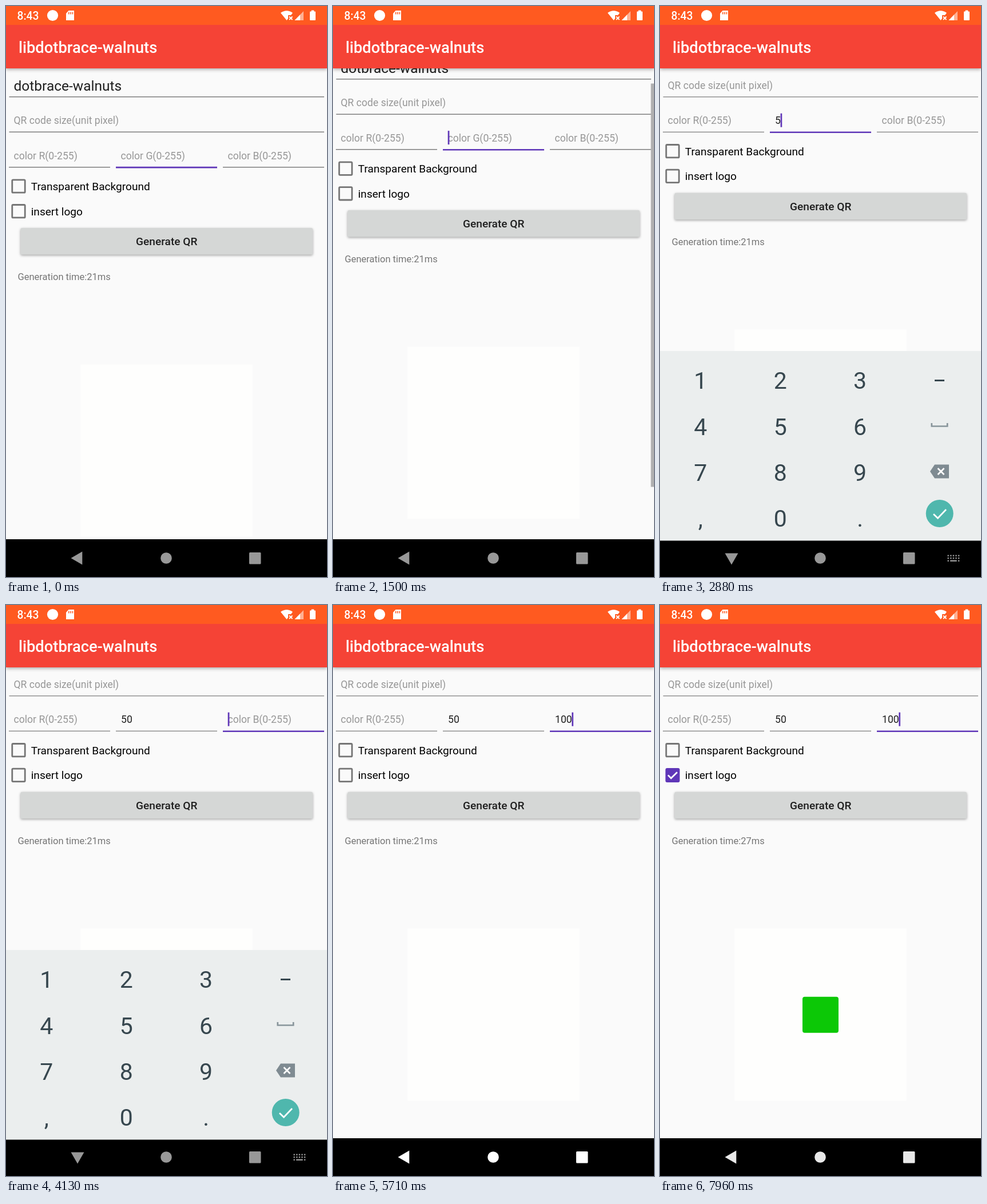
Write an HTML page with a canvas that moves like this. It is 561 px wide and 998 px high and loops after 8000 ms.

```html
<!DOCTYPE html>
<html lang="en">
<head>
<meta charset="utf-8">
<title>Generator form</title>
<style>
html, body { margin: 0; width: 100%; height: 100%; overflow: hidden; background: #000; }
canvas { display: block; width: 100%; height: 100%; }
</style>
</head>
<body>
<canvas id="stage" width="561" height="998"></canvas>
<script>
const W = 561, H = 998, LOOP = 8000;
const NAV_TOP = 932, KEYS_TOP = 603;
const PURPLE = '#5f36b8', GREY = '#757575', INK = '#1f1f1f', HINT = '#979797';
const ctx = document.getElementById('stage').getContext('2d');

// Moments in the loop, in ms
const SCROLL = [1330, 2150], KEYS_IN = [2300, 2540], KEYS_OUT = [5350, 5560];
const FOCUS_B = 3750, CHECKED = 5980, GENERATED = 6480;
const TYPED_G = [[2760, '5'], [3120, '50']];
const TYPED_B = [[4150, '1'], [4420, '10'], [4650, '100']];

const clamp = v => Math.max(0, Math.min(1, v));
const ramp = (t, [a, b]) => clamp((t - a) / (b - a));
const easeOut = p => 1 - (1 - p) ** 3;
const typed = (t, steps) => steps.reduce((s, [at, text]) => (t >= at ? text : s), '');

function text(s, x, y, size, color, weight = 400, align = 'left') {
  ctx.font = `${weight} ${size}px Roboto, sans-serif`;
  ctx.textAlign = align;
  ctx.fillStyle = color;
  ctx.fillText(s, x, y);
}

function rect(x, y, w, h, color, r = 0) {
  ctx.fillStyle = color;
  ctx.beginPath();
  ctx.roundRect(x, y, w, h, r);
  ctx.fill();
}

function circle(x, y, r, color) {
  ctx.fillStyle = color;
  ctx.beginPath();
  ctx.arc(x, y, r, 0, Math.PI * 2);
  ctx.fill();
}

function trace(points) {
  ctx.beginPath();
  points.forEach(([x, y], i) => (i ? ctx.lineTo(x, y) : ctx.moveTo(x, y)));
}

function poly(points, color) {
  trace(points);
  ctx.closePath();
  ctx.fillStyle = color;
  ctx.fill();
}

function line(points, color, width) {
  trace(points);
  ctx.strokeStyle = color;
  ctx.lineWidth = width;
  ctx.stroke();
}

function shadow(blur, dy, alpha, draw) {
  ctx.save();
  ctx.shadowColor = `rgba(0,0,0,${alpha})`;
  ctx.shadowBlur = blur;
  ctx.shadowOffsetY = dy;
  draw();
  ctx.restore();
}

function statusBar() {
  rect(0, 0, W, 33, '#ff5a20');
  text('8:43', 19.5, 23.5, 19.3, '#fff', 500);
  circle(81.5, 16.5, 9.6, '#fff');
  // memory card
  poly([[109.5, 8], [119, 8], [119, 25], [105, 25], [105, 13]], '#fff');
  [109, 112.3, 115.6].forEach(x => rect(x, 10.5, 1.6, 4, '#ff5a20'));
  // wifi without connection
  ctx.beginPath();
  ctx.moveTo(490.5, 25);
  ctx.lineTo(480, 12);
  ctx.quadraticCurveTo(490.5, 4.5, 501, 12);
  ctx.lineTo(498, 16);
  ctx.lineTo(493, 16);
  ctx.lineTo(493, 22);
  ctx.closePath();
  ctx.fillStyle = '#fff';
  ctx.fill();
  line([[495, 18.5], [500.5, 24]], '#fff', 1.8);
  line([[500.5, 18.5], [495, 24]], '#fff', 1.8);
  // signal
  poly([[520, 9], [520, 25], [504.5, 25]], '#ffb093');
  poly([[514, 15.2], [514, 25], [504.5, 25]], '#fff');
  // battery
  rect(531, 9.5, 10, 15.5, '#fff', 1);
  rect(533.7, 7.5, 4.6, 3, '#fff');
}

function appBar() {
  shadow(6, 2, 0.32, () => rect(0, 33, W, 76, '#f54336'));
  text('libdotbrace-walnuts', 22, 81.5, 27.3, '#fff', 500);
}

function underline(x, y, w, focused) {
  if (focused) rect(x, y - 0.2, w, 2.6, PURPLE);
  else rect(x, y, w, 1.4, '#7e7e7e');
}

function numberField(x, hint, value, focused, caret) {
  if (value) text(value, x + 9, 267.8, 17.6, INK);
  else text(hint, x + 8.5, 267.8, 17.6, HINT);
  underline(x, 281, 177, focused);
  if (caret) {
    ctx.font = '400 17.6px Roboto, sans-serif';
    rect(x + 8.7 + ctx.measureText(value).width, 249, 2.7, 24, PURPLE);
  }
}

function checkbox(y, label, checked) {
  if (checked) {
    rect(9.5, y - 12.3, 25, 25, PURPLE, 3);
    line([[14, y + 0.2], [19.3, y + 5.6], [30, y - 5]], '#fff', 2.7);
  } else {
    ctx.strokeStyle = GREY;
    ctx.lineWidth = 2.8;
    ctx.beginPath();
    ctx.roundRect(10.8, y - 11, 22.4, 22.4, 1.5);
    ctx.stroke();
  }
  text(label, 43.7, y + 7, 19.1, '#000');
}

function caretOn(t) {
  if (t < KEYS_IN[0]) return (t + 950) % 1000 < 500;
  const starts = [KEYS_IN[0], ...TYPED_G.map(s => s[0]), FOCUS_B, ...TYPED_B.map(s => s[0])];
  const last = Math.max(...starts.filter(s => s <= t));
  return (t - last) % 1000 < 500;
}

function form(t, scroll) {
  const onB = t >= FOCUS_B, caret = caretOn(t), done = t >= GENERATED;
  ctx.save();
  ctx.beginPath();
  ctx.rect(0, 109, W, NAV_TOP - 109);
  ctx.clip();
  ctx.translate(0, -scroll);

  text('dotbrace-walnuts', 13.5, 148, 24.5, INK);
  underline(5.5, 158, 550.5, false);
  text('QR code size(unit pixel)', 13.5, 206.3, 17.6, HINT);
  underline(5.5, 219.5, 550.5, false);
  numberField(5, 'color R(0-255)', '', false, false);
  numberField(192, 'color G(0-255)', typed(t, TYPED_G), !onB, !onB && caret);
  numberField(379, 'color B(0-255)', typed(t, TYPED_B), onB, onB && caret);
  checkbox(314.8, 'Transparent Background', false);
  checkbox(358.5, 'insert logo', t >= CHECKED);
  shadow(4, 1.5, 0.35, () => rect(25.5, 388, 510.5, 46.5, '#d5d7d6', 2.5));
  text('Generate QR', 280.7, 418, 19.1, INK, 500, 'center');
  text(`Generation time:${done ? 27 : 21}ms`, 20.5, 479.3, 16.5, GREY);

  rect(130, 626.5, 301, 301, '#fefefd');
  if (done) rect(249, 746, 63, 63, '#0cc806', 4);
  ctx.restore();
}

function scrollBar(t, scroll) {
  const alpha = ramp(t, [SCROLL[0], SCROLL[0] + 60]) * (1 - ramp(t, [2200, 2450]));
  if (!alpha) return;
  const view = 824, content = 963;
  ctx.globalAlpha = alpha;
  rect(555.5, 109 + scroll * view / content, 5.5, view * view / content, '#b0b0b1');
  ctx.globalAlpha = 1;
}

function keyboard(shown) {
  if (!shown) return;
  const ink = '#37474f', soft = '#88959b';
  ctx.save();
  ctx.beginPath();
  ctx.rect(0, KEYS_TOP, W, 331.5);
  ctx.clip();
  ctx.translate(0, (1 - shown) * (NAV_TOP - KEYS_TOP));
  rect(0, KEYS_TOP - 0.5, W, 333, '#ebeeee');
  ['123', '456', '789', ',0.'].forEach((row, r) => {
    [...row].forEach((key, c) => text(key, 70.8 + c * 139.4, 669.3 + r * 80.3, 41, ink, 400, 'center'));
  });
  rect(480, 653, 17, 3, ink);
  line([[474.8, 729], [474.8, 734.5], [502.2, 734.5], [502.2, 729]], soft, 2.7);
  // delete
  poly([[472, 813.5], [480, 801.5], [505, 801.5], [505, 825.5], [480, 825.5]], '#7f8b92');
  line([[485.5, 808], [496.5, 819]], '#fff', 2.7);
  line([[496.5, 808], [485.5, 819]], '#fff', 2.7);
  // confirm
  circle(488.7, 887, 24, '#4fb7ad');
  line([[478, 888], [485.5, 895.3], [500, 880]], '#fff', 2.7);
  ctx.restore();
}

function navBar(t) {
  const typing = t >= KEYS_IN[0] && t < KEYS_OUT[0] + 60;
  const bright = ramp(t, [5150, 5550]) * (1 - 0.25 * ramp(t, [7750, 8000]));
  const level = Math.round(152 + 103 * bright);
  const color = `rgb(${level},${level},${level})`;
  rect(0, NAV_TOP, W, H - NAV_TOP, '#000');

  const press = ramp(t, [5130, 5250]) * (1 - ramp(t, [5350, 5560]));
  if (press) {
    ctx.globalAlpha = press;
    rect(58, 934.5, 133, 63.5, '#1f1f21', 31);
    ctx.globalAlpha = 1;
  }
  if (typing) {
    poly([[113.5, 956.5], [136.5, 956.5], [125, 976.5]], color);
    for (let r = 0; r < 2; r++) {
      for (let c = 0; c < 5; c++) rect(502.5 + c * 4.6, 959.5 + r * 4.4, 2.4, 2.4, color);
    }
    rect(502.5, 968.5, 2.4, 2.4, color);
    rect(507.1, 968.5, 11.6, 2.4, color);
    rect(520.9, 968.5, 2.4, 2.4, color);
  } else {
    poly([[113.5, 965], [133.3, 953.5], [133.3, 976.5]], color);
  }
  circle(280, 965, 9.8, color);
  rect(425, 955, 20.5, 20.5, color, 1.5);
}

function draw(t) {
  const scroll = 61.3 * easeOut(ramp(t, SCROLL));
  const shown = easeOut(ramp(t, KEYS_IN)) * (1 - ramp(t, KEYS_OUT) ** 2);
  rect(0, 0, W, H, '#fafafa');
  form(t, scroll);
  scrollBar(t, scroll);
  appBar();
  statusBar();
  navBar(t);
  keyboard(shown);
}

const start = performance.now();
function tick() {
  draw((performance.now() - start) % LOOP);
  requestAnimationFrame(tick);
}
tick();
</script>
</body>
</html>
```
